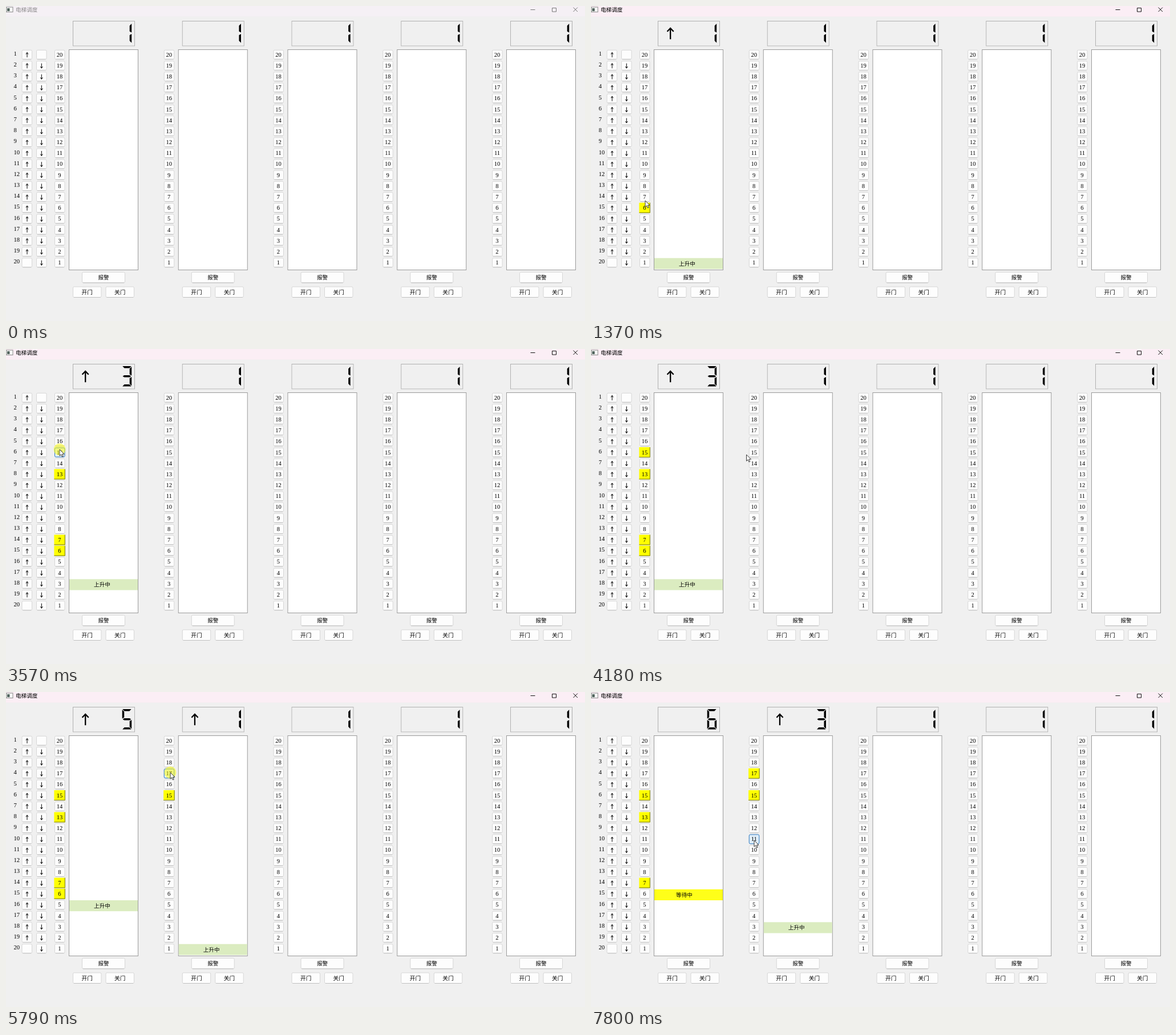
An HTML page that plays this animation: 1015x552 px, repeating every 8000 ms.

```html
<!DOCTYPE html>
<html lang="zh">
<head>
<meta charset="utf-8">
<title>电梯调度</title>
<style>
html, body { margin: 0; width: 100%; height: 100%; overflow: hidden; background: #f0f0f0; }
svg { display: block; width: 1015px; height: 552px; }
text { font: 9.6px "Noto Sans CJK SC", "Noto Sans CJK", sans-serif; fill: #000; text-anchor: middle; }
.num { font: 10.6px "Liberation Serif", serif; }
.left { text-anchor: start; }
.key { fill: #fdfdfd; stroke: #d6d6d6; }
.edge { stroke: #c0c0c0; }
.hot { fill: #e0eef9; stroke: #2f7cc4; opacity: 0; }
.lit { visibility: hidden; }
.arrow { fill: none; stroke: #000; stroke-width: 1; }
.big { fill: none; stroke: #000; stroke-width: 2.3; }
.icons { fill: none; stroke: #111; stroke-width: 1; }
</style>
</head>
<body>
<svg id="stage" viewBox="0 0 1015 552"></svg>
<script>
const LOOP = 8000, STEP = 19.18, COLS = 5, FLOORS = 20;
const stage = document.getElementById('stage');
const rect = (x, y, w, h, attrs) => `<rect x="${x}" y="${y}" width="${w}" height="${h}" ${attrs}/>`;
const path = (d, attrs = '') => `<path d="${d}" ${attrs}/>`;
const text = (x, y, s, attrs = '') => `<text x="${x}" y="${y}" ${attrs}>${s}</text>`;
const colX = c => 191.75 * c;
const floorY = f => 449.7 - (f - 1) * STEP;

function key(x, y, w, h) {
  return rect(x + .5, y + .5, w - 1, h - 1, 'rx="2" class="key"') +
    path(`M${x + 2} ${y + h - .5}h${w - 4}`, 'class="edge"');
}

// Seven segments inside a 16.5 x 35.5 cell
const SEGMENTS = {
  a: 'M.5 0H16L12.7 3.5H3.8Z',
  b: 'M16.5 1V16.5L13 14.5V4.5Z',
  c: 'M16.5 19V34.5L13 31V21Z',
  d: 'M.5 35.5H16L12.7 32H3.8Z',
  e: 'M0 19V34.5L3.5 31V21Z',
  f: 'M0 1V16.5L3.5 14.5V4.5Z',
  g: 'M.8 17.8L3.6 16H12.9L15.7 17.8L12.9 19.5H3.6Z'
};
const DIGITS = ['', 'bc', 'abged', 'abgcd', 'fgbc', 'afgcd', 'afgedc'];
const digitPath = n => [...DIGITS[n]].map(s => SEGMENTS[s]).join('');

function titleBar() {
  return rect(0, 0, 1015, 18.5, 'id="bar"') +
    rect(.5, 2, 11.5, 8.5, 'fill="#f8f8f8" stroke="#8a8a8a"') +
    rect(2, 4, 4.5, 5, 'fill="#50635c"') +
    text(17, 9.7, '电梯调度', 'id="title" class="left"') +
    path('M919.5 6.5h8M957.5 3.5h7v6.5h-7zM994.5 2.5l7.5 7.5m0 -7.5l-7.5 7.5', 'id="controls" class="icons"');
}

function hallRow(r) {
  const y = 85.3 + (r - 1) * STEP, top = y - 8.5;
  const up = `M37 ${top + 13.2}v-8.5m-2 3l2 -3l2 3`;
  const down = `M62.3 ${top + 4.6}v8.5m-2 -3l2 3l2 -3`;
  return text(13.5, y + 1.6, r, 'class="num left"') +
    key(27.5, top, 18.5, 17) + key(53, top, 18.5, 17) +
    (r < FLOORS ? path(up, 'class="arrow"') : '') +
    (r > 1 ? path(down, 'class="arrow"') : '');
}

function floorKey(c, f) {
  const y = floorY(f) - 8.5;
  return `<g id="k${c}-${f}">` + key(85, y, 18.5, 17) +
    rect(85.5, y + .5, 17.5, 16, 'rx="2" class="hot"') +
    '<g class="lit">' + rect(84.4, y - .6, 19.4, 18, 'fill="#ff0"') +
    path(`M84.4 ${y + 16.9}h18.9v-17.5`, 'stroke="#77771c" fill="none"') + '</g>' +
    text(94, floorY(f) + 3.4, f, 'class="num"') + '</g>';
}

function shaft(c) {
  let s = `<g transform="translate(${colX(c)})">` +
    rect(117.5, 26.5, 108, 44, 'fill="none" stroke="#fff"') +
    rect(117.5, 26.5, 108, 43.5, 'fill="none" stroke="#b0b0b0"') +
    path('M139.2 58.3V39.3M133.6 44.8l5.6 -5.8l5.6 5.8', `id="up${c}" class="big"`) +
    path(digitPath(1), `id="n${c}" transform="translate(203.7 30)"`) +
    rect(110.5, 76.5, 121, 386, 'fill="#fff" stroke="#9a9a9a"') +
    `<g id="car${c}">` + rect(111, 441.7, 120, 19.2, '') + text(168.5, 454.7, '') + '</g>';
  for (let f = 1; f <= FLOORS; f++) s += floorKey(c, f);
  return s + key(133, 466, 76, 19.5) + text(171, 479.2, '报警') +
    key(117, 491.5, 50.5, 19.5) + text(142.2, 504.5, '开门') +
    key(174.5, 491.5, 50.5, 19.5) + text(199.7, 504.5, '关门') + '</g>';
}

let scene = rect(0, 0, 1015, 552, 'fill="#f0f0f0"') + titleBar();
for (let r = 1; r <= FLOORS; r++) scene += hallRow(r);
for (let c = 0; c < COLS; c++) scene += shaft(c);
stage.innerHTML = scene +
  '<circle id="click" r="10.5" fill="#ff0" fill-opacity=".5"/>' +
  path('M0 0V11.2L2.6 8.8L4.4 12.9L6.3 12.1L4.5 8.1H8Z',
    'id="cursor" fill="#fff" stroke="#222" stroke-width=".9" stroke-linejoin="round"');

const el = id => document.getElementById(id);
const show = (node, on) => { node.style.visibility = on ? 'visible' : 'hidden'; };

// Buttons: hover start, press, lamp on, lamp off
const PRESSES = [
  { c: 0, f: 6, hover: 1080, press: 1200, on: 1300, off: 6550 },
  { c: 0, f: 7, hover: 1560, press: 1900, on: 2000 },
  { c: 0, f: 13, hover: 2660, press: 2800, on: 2900 },
  { c: 0, f: 15, hover: 3200, press: 3500, on: 3620 },
  { c: 1, f: 15, hover: 4670, press: 5250, on: 5350 },
  { c: 1, f: 17, hover: 5580, press: 5740, on: 5860 },
  { c: 1, f: 11, hover: 6640, press: LOOP, on: LOOP }
];
for (const p of PRESSES) {
  const g = el(`k${p.c}-${p.f}`);
  p.hot = g.querySelector('.hot');
  p.lit = g.querySelector('.lit');
}

// Cars climb one floor per 1050 ms after the first call
const RISE = 1050;
const CARS = [
  { c: 0, start: 1300, stop: 6, wait: 7480 },
  { c: 1, start: 5350, stop: 15, wait: LOOP }
];

const TRACK = [
  [400, 330, 552], [850, 130, 380], [1150, 94, 351], [1300, 94, 351], [1370, 95, 341],
  [1600, 95, 331], [2050, 95, 331], [2500, 94, 240], [2720, 94, 216], [2930, 94, 216],
  [3250, 94, 176], [3700, 94, 176], [4100, 270, 186], [4400, 284, 181], [4740, 282, 179],
  [5380, 283, 180], [5640, 288, 141], [5980, 288, 141], [6620, 290, 254], [7300, 286, 260]
];

const clamp = v => Math.max(0, Math.min(1, v));

function cursorAt(t) {
  const i = TRACK.findIndex(k => k[0] > t);
  if (i < 0) return TRACK[TRACK.length - 1].slice(1);
  const [t0, x0, y0] = TRACK[Math.max(0, i - 1)], [t1, x1, y1] = TRACK[i];
  const u = i ? clamp((t - t0) / (t1 - t0)) : 0, e = u * u * (3 - 2 * u);
  return [x0 + (x1 - x0) * e, y0 + (y1 - y0) * e];
}

function drawCar({ c, start, stop, wait }, t) {
  const moving = t >= start;
  const floor = moving ? Math.min(stop, 1 + Math.floor((t - start) / RISE)) : 1;
  const arrived = floor === stop, waiting = arrived && t >= wait;
  const car = el('car' + c), [box, label] = car.children;
  show(car, moving);
  show(el('up' + c), moving && !arrived);
  el('n' + c).setAttribute('d', digitPath(floor));
  car.setAttribute('transform', `translate(0 ${-(floor - 1) * STEP})`);
  box.setAttribute('fill', waiting ? '#ffff19' : '#dbecc0');
  label.setAttribute('x', arrived ? 163.5 : 168.5);
  label.textContent = waiting ? '等待中' : arrived ? '开门中' : '上升中';
}

function draw(t) {
  const active = t >= 1200;
  el('bar').setAttribute('fill', active ? '#fbeef5' : '#f5f0f5');
  el('title').style.fill = active ? '#000' : '#8c8a8c';
  el('controls').style.stroke = active ? '#111' : '#777';

  for (const p of PRESSES) {
    const off = p.off || Infinity;
    show(p.lit, t >= p.on && t < off);
    p.hot.style.opacity = t >= off ? clamp((off + 280 - t) / 150) : clamp((t - p.hover) / 150);
  }
  CARS.forEach(car => drawCar(car, t));

  const at = `translate(${cursorAt(t).map(v => v.toFixed(2)).join(' ')})`;
  for (const id of ['cursor', 'click']) el(id).setAttribute('transform', at);
  show(el('cursor'), t >= TRACK[0][0]);
  show(el('click'), PRESSES.some(p => t >= p.press && t < p.on));
}

for (let c = CARS.length; c < COLS; c++) {
  show(el('up' + c), false);
  show(el('car' + c), false);
}
const begin = performance.now();
function tick() {
  draw((performance.now() - begin) % LOOP);
  requestAnimationFrame(tick);
}
tick();
</script>
</body>
</html>
```
